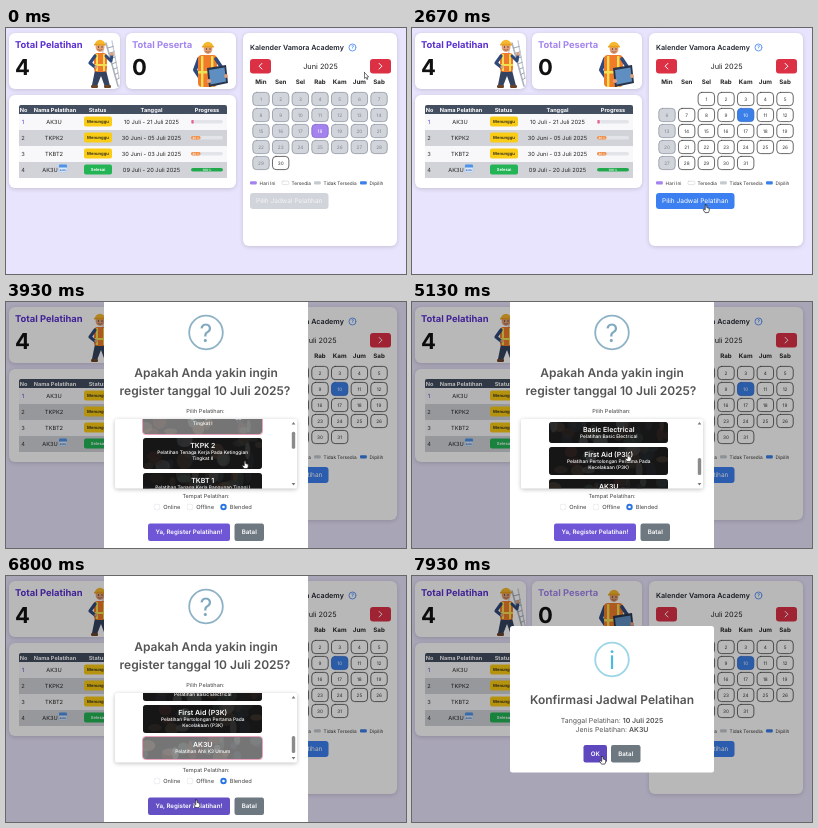
An HTML page with a canvas for the animation above (8000 ms loop, 400 by 246 pixels).

```html
<!DOCTYPE html>
<html lang="id">
<head>
<meta charset="utf-8">
<title>Jadwal Pelatihan</title>
<style>
html, body { margin: 0; width: 100%; height: 100%; overflow: hidden; background: #e9e4fd; }
canvas { display: block; width: 400px; height: 246px; }
</style>
</head>
<body>
<canvas id="stage"></canvas>
<script>
const W = 400, H = 246, LOOP = 8000;
const MONTH_AT = 550, PICK_AT = 1850, ASK_AT = 2900, ASK_END = 6940, CONFIRM_AT = 7063, CHOOSE_AT = 6230;
const canvas = document.getElementById('stage');
const dpr = window.devicePixelRatio || 1;
canvas.width = W * dpr;
canvas.height = H * dpr;
const c = canvas.getContext('2d');

const clamp = p => Math.max(0, Math.min(1, p));
const mix = (a, b, p) => a + (b - a) * p;
const smooth = p => p * p * (3 - 2 * p);

// CSS "ease" curve
function ease(p) {
  if (p <= 0) return 0;
  if (p >= 1) return 1;
  const bez = (u, a, b) => 3 * u * (1 - u) * (1 - u) * a + 3 * u * u * (1 - u) * b + u * u * u;
  let lo = 0, hi = 1;
  for (let i = 0; i < 20; i++) {
    const mid = (lo + hi) / 2;
    if (bez(mid, .25, .25) < p) lo = mid; else hi = mid;
  }
  return bez(lo, .1, 1);
}

// Value of keys [[time, a, b...]] at t
function track(keys, t) {
  let i = 0;
  while (i < keys.length - 1 && keys[i + 1][0] <= t) i++;
  const a = keys[i], b = keys[i + 1] || a;
  const p = a === b ? 0 : smooth(clamp((t - a[0]) / (b[0] - a[0])));
  return a.slice(1).map((v, k) => mix(v, b[k + 1], p));
}

function box(x, y, w, h, r, fill, line, lw = .8) {
  c.beginPath();
  c.roundRect(x, y, w, h, r);
  if (fill) { c.fillStyle = fill; c.fill(); }
  if (line) { c.strokeStyle = line; c.lineWidth = lw; c.stroke(); }
}

function disc(x, y, rx, ry, fill) {
  c.beginPath();
  c.ellipse(x, y, rx, ry, 0, 0, 7);
  c.fillStyle = fill;
  c.fill();
}

function poly(points, fill, line, lw = 1) {
  c.beginPath();
  points.forEach(([x, y], i) => i ? c.lineTo(x, y) : c.moveTo(x, y));
  if (fill) { c.closePath(); c.fillStyle = fill; c.fill(); }
  if (line) { c.strokeStyle = line; c.lineWidth = lw; c.lineCap = c.lineJoin = 'round'; c.stroke(); }
}

// y is the middle of the capitals
function text(s, x, y, size, color, weight = 400, align = 'center') {
  c.font = `${weight} ${size}px Inter, sans-serif`;
  c.textAlign = align;
  c.fillStyle = color;
  c.fillText(s, x, y + size * .36);
}

function shadowed(blur, alpha, draw) {
  c.save();
  c.shadowColor = `rgba(0,0,0,${alpha})`;
  c.shadowBlur = blur * dpr;
  c.shadowOffsetY = dpr;
  draw();
  c.restore();
}

const card = (x, y, w, h) => shadowed(4, .16, () => box(x, y, w, h, 6, '#fff'));

function head(x, y) {
  disc(x, y + 2, 4.4, 5, '#e2a178');
  disc(x - 1.5, y + 2, .6, .7, '#3a2a22');
  disc(x + 2, y + 2, .6, .7, '#3a2a22');
  poly([[x - 2, y + 4.6], [x, y + 5.3], [x + 2, y + 4.6]], null, '#8c4a35', .7);
  c.beginPath();
  c.arc(x, y, 5.2, Math.PI, 0);
  c.fillStyle = '#f5b82e';
  c.fill();
  box(x - 6, y - 1.2, 12, 1.8, .9, '#e9a01f');
}

function ladderWorker() {
  poly([[100, 15], [112, 58]], null, '#aeb4bf', 1.6);
  poly([[106, 13], [113, 50]], null, '#c6cad2', 1.3);
  poly([[98, 17], [91, 58]], null, '#c6cad2', 1.3);
  for (let i = 0; i < 7; i++) {
    const y = 20 + i * 5.3;
    poly([[101.4 + i * 1.48, y], [107.2 + i * .95, y - 1.5]], null, '#9da3af', 1);
  }
  poly([[89, 42], [100, 42], [104, 58], [99, 59], [95, 48], [91, 58], [86, 57]], '#34435f');
  box(85, 57, 7, 3, 1.2, '#6b4328');
  box(98, 57, 7, 3, 1.2, '#6b4328');
  box(88, 25, 13, 19, 3.5, '#ef7a2c');
  box(90, 26, 2, 17, .5, '#f3df52');
  box(97, 26, 2, 17, .5, '#f3df52');
  box(88, 36, 13, 2, .5, '#f3df52');
  poly([[89, 28], [84, 35], [89, 39]], null, '#2f4a7a', 3.2);
  poly([[100, 28], [105, 33], [106, 27]], null, '#2f4a7a', 3);
  disc(106, 26, 1.8, 1.8, '#e2a178');
  disc(90, 39, 1.7, 1.7, '#e2a178');
  head(94, 17);
}

function tabletWorker() {
  poly([[193, 31], [189, 42], [195, 51]], null, '#2f4a7a', 4);
  box(192, 27, 19, 32, 4, '#f07b2b');
  box(195, 28, 2.4, 31, .5, '#f3df52');
  box(205, 28, 2.4, 31, .5, '#f3df52');
  box(192, 43, 19, 2.6, .5, '#f3df52');
  poly([[210, 31], [216, 40], [214, 48]], null, '#2f4a7a', 3.6);
  poly([[201, 40], [220, 37], [222, 55], [203, 59]], '#27344b');
  poly([[203, 42], [218.5, 39.5], [220, 53.5], [204.5, 56.5]], '#5f8fc0');
  disc(203, 53, 2.2, 2, '#e2a178');
  disc(220, 48, 1.8, 2, '#e2a178');
  head(202, 19);
}

const ROWS = [
  ['AK3U', '10 Juli - 21 Juli 2025', 0],
  ['TKPK2', '30 Juni - 05 Juli 2025', 30],
  ['TKBT2', '30 Juni - 03 Juli 2025', 30],
  ['AK3U', '09 Juli - 20 Juli 2025', 100]
];

function drawTable() {
  card(3, 67, 227, 93);
  box(13, 77, 208, 9, [2, 2, 0, 0], '#434e60');
  [['No', 17.5], ['Nama Pelatihan', 49], ['Status', 91.5], ['Tanggal', 145.5], ['Progress', 201]]
    .forEach(([s, x]) => text(s, x, 81.5, 5.6, '#fff', 700));
  ROWS.forEach(([name, date, pct], i) => {
    const y = 94 + i * 16, done = pct === 100;
    c.fillStyle = i % 2 ? '#d1d3d8' : '#f8f8fa';
    c.fillRect(13, y - 8, 208, 16);
    text(i + 1, 17, y - .5, 5.7, i ? '#333' : '#5b35c8');
    text(name, done ? 44 : 48, y - .5, 5.7, '#222');
    box(78, y - 5.5, 28, 10, 2, done ? '#22b455' : '#facc15');
    text(done ? 'Selesai' : 'Menunggu', 92, y - .5, 4.2, done ? '#fff' : '#222', 600);
    text(date, 145.5, y - .5, 5.7, '#222');
    box(185, y - 2, 32, 3.6, 1.8, '#e2e4e9');
    box(185, y - 2, Math.max(3, pct * .32), 3.6, 1.8, done ? '#22a84c' : pct ? '#f0883e' : '#e0457b');
    text(pct + '%', done ? 201 : pct ? 190 : 186.5, y - .2, 3.2, '#fff', 600);
  });
  box(53, 136.5, 8, 7.5, 1.2, '#dbe9fb', '#9cc0ee', .4);
  box(53, 136.5, 8, 3, [1.2, 1.2, 0, 0], '#4f93e6');
  text('BARU', 57, 141.8, 2.4, '#3c72c4', 700);
}

const colX = i => 255 + i * 19.67;

function drawCalendar(t) {
  const july = t >= MONTH_AT, picked = t >= PICK_AT;
  card(237, 5, 154, 213);
  text('Kalender Vamora Academy', 244, 19.5, 7.15, '#1f2430', 600, 'left');
  c.beginPath();
  c.arc(346.5, 19.5, 3.5, 0, 7);
  c.strokeStyle = '#3b82f6';
  c.lineWidth = .8;
  c.stroke();
  text('?', 346.5, 19.5, 5, '#3b82f6', 600);
  [[244, -1], [364, 1]].forEach(([x, d]) => {
    box(x, 31, 21, 14.5, 3, '#dc3145');
    poly([[x + 10.5 - d * 1.4, 35.4], [x + 10.5 + d * 1.4, 38.2], [x + 10.5 - d * 1.4, 41]], null, '#fff', 1);
  });
  text(july ? 'Juli 2025' : 'Juni 2025', 314.5, 38.2, 7.35, '#222');
  ['Min', 'Sen', 'Sel', 'Rab', 'Kam', 'Jum', 'Sab'].forEach((s, i) => text(s, colX(i), 53.5, 6.2, '#222', 700));

  const first = july ? 2 : 0, days = july ? 31 : 30;
  for (let d = 1; d <= days; d++) {
    const slot = d + first - 1, x = colX(slot % 7), y = 71 + Math.floor(slot / 7) * 16;
    const open = july ? slot % 7 > 0 : d === 30;
    let fill = open ? '#fff' : '#d1d5db', line = open ? '#444' : '#9097a3', ink = open ? '#333' : '#7b828e';
    if (!july && d === 18) { fill = '#a583ee'; line = '#8264cf'; ink = '#fff'; }
    if (july && picked && d === 10) { fill = '#3b7fe8'; line = '#3069c8'; ink = '#fff'; }
    box(x - 8.2, y - 6.6, 16.4, 13.2, 3.6, fill, line);
    text(d, x, y, 4.7, ink);
  }

  [['Hari Ini', 244, '#a583ee'], ['Tersedia', 276, '#fff'], ['Tidak Tersedia', 308, '#c5c9d0'], ['Dipilih', 354, '#3b7fe8']]
    .forEach(([s, x, fill]) => {
      box(x, 153.2, 6.8, 3.4, 1, fill, fill === '#fff' ? '#c5c9d0' : null, .5);
      text(s, x + 9.6, 155, 4.75, '#333', 400, 'left');
    });
  box(244, 165, 78.5, 16, 3, picked ? '#3b7ff0' : '#d1d4da');
  text('Pilih Jadwal Pelatihan', 283.2, 173, 6.5, picked ? '#fff' : '#f4f5f7');
}

function drawPage(t) {
  c.fillStyle = '#e9e4fd';
  c.fillRect(0, 0, W, H);
  card(3, 5, 111, 56);
  card(120, 5, 110, 56);
  text('Total Pelatihan', 9, 17, 9.4, '#5a2fd0', 700, 'left');
  text('Total Peserta', 126, 17, 9.4, '#a385ee', 700, 'left');
  text('4', 9, 39.5, 22, '#111', 700, 'left');
  text('0', 126, 39.5, 22, '#111', 700, 'left');
  ladderWorker();
  tabletWorker();
  drawTable();
  drawCalendar(t);
}

const ITEMS = [
  ['TKPK 1', 31, 'Pelatihan Tenaga Kerja Pada Ketinggian', 'Tingkat I'],
  ['TKPK 2', 31, 'Pelatihan Tenaga Kerja Pada Ketinggian', 'Tingkat II'],
  ['TKBT 1', 22, 'Pelatihan Tenaga Kerja Bangunan Tinggi I'],
  ['TKBT 2', 22, 'Pelatihan Tenaga Kerja Bangunan Tinggi II'],
  ['Basic Electrical', 21, 'Pelatihan Basic Electrical'],
  ['First Aid (P3K)', 28, 'Pelatihan Pertolongan Pertama Pada', 'Kecelakaan (P3K)'],
  ['AK3U', 22, 'Pelatihan Ahli K3 Umum']
];

function photo(y, h, seed, chosen) {
  const rnd = () => (seed = seed * 16807 % 2147483647) / 2147483647;
  const tones = ['#6b5a4a', '#4b5a55', '#7d7f80', '#5a3d38', '#39424c'];
  c.save();
  box(137, y, 119, h, 3, '#2d2d2f');
  c.clip();
  for (let i = 0; i < 22; i++) {
    c.globalAlpha = .35 + rnd() * .3;
    disc(137 + rnd() * 119, y + rnd() * h, 2 + rnd() * 6, 3 + rnd() * 6, tones[i % 5]);
  }
  c.globalAlpha = 1;
  c.fillStyle = chosen ? 'rgba(190,190,190,.5)' : 'rgba(0,0,0,.5)';
  c.fillRect(137, y, 119, h);
  c.restore();
  if (chosen) box(136.5, y - .5, 120, h + 1, 3, null, '#eba0bd', 1);
}

const SCROLL = [[3720, 0], [3930, 19], [4150, 19], [4450, 62], [4600, 62], [5000, 122], [5450, 122], [5750, 138]];

function drawList(t) {
  const [scroll] = track(SCROLL, t), chosen = t < CHOOSE_AT ? 0 : 6;
  shadowed(4, .25, () => box(109, 117, 182, 69.5, 2, '#fff'));
  c.save();
  c.beginPath();
  c.rect(109, 117, 182, 69.5);
  c.clip();
  let y = 120 - scroll;
  ITEMS.forEach(([name, h, ...lines], i) => {
    photo(y, h, 977 * (i + 3), i === chosen);
    text(name, 196.7, y + 7.2, 7, '#fff', 600);
    lines.forEach((s, k) => text(s, 196.7, y + 14.2 + k * 6.2, 4.8, '#fff', 500));
    y += h + 4;
  });
  c.restore();
  poly([[285.6, 122.4], [287.5, 120], [289.4, 122.4]], '#777');
  poly([[285.6, 181], [287.5, 183.4], [289.4, 181]], '#777');
  box(285.8, 125 + scroll / 3.94, 3.4, 17, 1.5, '#8b8b8b');
}

function button(s, x, y, w, fill) {
  box(x, y, w, 17.5, 2.2, fill);
  text(s, x + w / 2, y + 8.7, 6.2, '#fff', 600);
}

// Ring tips upright while its mark turns into place
function icon(mark, y, age, ring, ink) {
  c.save();
  c.translate(200, y);
  c.scale(1, Math.abs(Math.cos((1 - ease(age / 500)) * 100 * Math.PI / 180)));
  c.beginPath();
  c.arc(0, 0, 16.8, 0, 7);
  c.strokeStyle = ring;
  c.lineWidth = 1.8;
  c.stroke();
  const p = ease(age / 800);
  if (mark === '?') c.scale(Math.cos((1 - p) * 2 * Math.PI), 1);
  else { c.rotate((1 - p) * Math.PI / 4); c.globalAlpha *= clamp(age / 200 - .4); }
  text(mark, 0, 0, 25, ink, 400);
  c.restore();
}

function drawAsk(t) {
  c.fillStyle = '#fff';
  c.fillRect(98, -4, 204, 254);
  icon('?', 30.5, t - ASK_AT, '#8db2c6', '#7fa8be');
  text('Apakah Anda yakin ingin', 200, 71, 12, '#545454', 600);
  text('register tanggal 10 Juli 2025?', 199, 89, 12, '#545454', 600);
  text('Pilih Pelatihan:', 199.5, 109, 5.6, '#444');
  drawList(t);
  text('Tempat Pelatihan:', 200, 194, 5.6, '#444');
  [['Online', 151], ['Offline', 184], ['Blended', 217.5]].forEach(([s, x], i) => {
    disc(x, 205, 3.2, 3.2, i === 2 ? '#2a74e0' : '#dfe1e5');
    disc(x, 205, i === 2 ? 1.3 : 2.7, i === 2 ? 1.3 : 2.7, '#fff');
    text(s, x + 6.2, 205, 5.7, '#444', 400, 'left');
  });
  button('Ya, Register Pelatihan!', 142, 221.5, 82, t > 6650 ? '#6450c4' : '#6f56d6');
  button('Batal', 228.5, 221.5, 29.5, '#6e7881');
}

function pair(label, value, y) {
  const size = 6.95;
  c.font = `400 ${size}px Inter, sans-serif`;
  const a = c.measureText(label).width;
  c.font = `600 ${size}px Inter, sans-serif`;
  const x = 200 - (a + c.measureText(value).width) / 2;
  text(label, x, y, size, '#545454', 400, 'left');
  text(value, x + a, y, size, '#545454', 600, 'left');
}

function drawConfirm(t) {
  box(98, 50, 204, 146.5, 2.5, '#fff');
  icon('i', 83.5, t - CONFIRM_AT, '#9bd6e6', '#4db9dc');
  text('Konfirmasi Jadwal Pelatihan', 200, 124, 12, '#545454', 600);
  pair('Tanggal Pelatihan: ', '10 Juli 2025', 144.2);
  pair('Jenis Pelatihan: ', 'AK3U', 153.2);
  button('OK', 171.5, 169, 23.5, t > 7740 ? '#5f48bd' : '#6f56d6');
  button('Batal', 199, 169, 29.5, '#6e7881');
}

function popScale(age) {
  const p = age / 300;
  if (p < .45) return mix(.7, 1.05, ease(p / .45));
  if (p < .8) return mix(1.05, .95, ease((p - .45) / .35));
  return mix(.95, 1, ease((p - .8) / .2));
}

function drawDialog(draw, t, from, to) {
  if (t < from || t > to + 120) return;
  const out = clamp((t - to) / 120);
  c.save();
  c.globalAlpha = 1 - out;
  c.translate(200, 123);
  const s = out ? mix(1, .5, ease(out)) : popScale(t - from);
  c.scale(s, s);
  c.translate(-200, -123);
  draw(t);
  c.restore();
}

function dim(t) {
  const fade = t < ASK_END
    ? clamp((t - ASK_AT) / 100)
    : t < CONFIRM_AT ? 1 - .8 * clamp((t - ASK_END) / 100) : mix(.2, 1, clamp((t - CONFIRM_AT) / 80));
  c.fillStyle = `rgba(0,0,0,${.28 * fade})`;
  c.fillRect(0, 0, W, H);
}

const PATH = [
  [0, 358.5, 44.5], [350, 374, 38], [700, 374, 38], [1500, 335, 86], [1950, 335, 86], [2500, 294, 177],
  [3450, 294, 177], [3850, 239, 159], [4300, 239, 159], [5000, 216, 152], [5500, 216, 152], [5800, 213, 154],
  [5950, 213, 154], [6150, 205, 172], [6350, 205, 172], [6750, 190.5, 224], [7250, 190.5, 224], [7800, 190.5, 180.5]
];
const HAND = [[230, 900], [1350, 2050], [2400, 2950], [3780, 6470], [6650, 6940], [7730, 8000]];

function drawCursor(t) {
  const [x, y] = track(PATH, t);
  c.save();
  c.translate(x, y);
  if (HAND.some(([a, b]) => t >= a && t < b)) {
    poly([[-.7, 0], [.7, 0], [.8, 2.6], [3.2, 3.3], [3.3, 5.4], [2.4, 7.6], [-1, 7.6], [-2.9, 4.6], [-2, 4], [-.8, 5], [-.7, 0]],
      '#fff', '#222', .7);
  } else {
    poly([[0, 0], [0, 6], [1.4, 4.8], [2.4, 7], [3.3, 6.6], [2.4, 4.5], [4.2, 4.4], [0, 0]], '#fff', '#222', .6);
  }
  c.restore();
}

function render(now) {
  const t = now % LOOP;
  c.setTransform(dpr, 0, 0, dpr, 0, 0);
  c.textRendering = 'geometricPrecision';
  drawPage(t);
  dim(t);
  drawDialog(drawAsk, t, ASK_AT, ASK_END);
  drawDialog(drawConfirm, t, CONFIRM_AT, LOOP);
  drawCursor(t);
}

const start = performance.now();
function tick() {
  render(performance.now() - start);
  requestAnimationFrame(tick);
}
tick();
</script>
</body>
</html>
```
